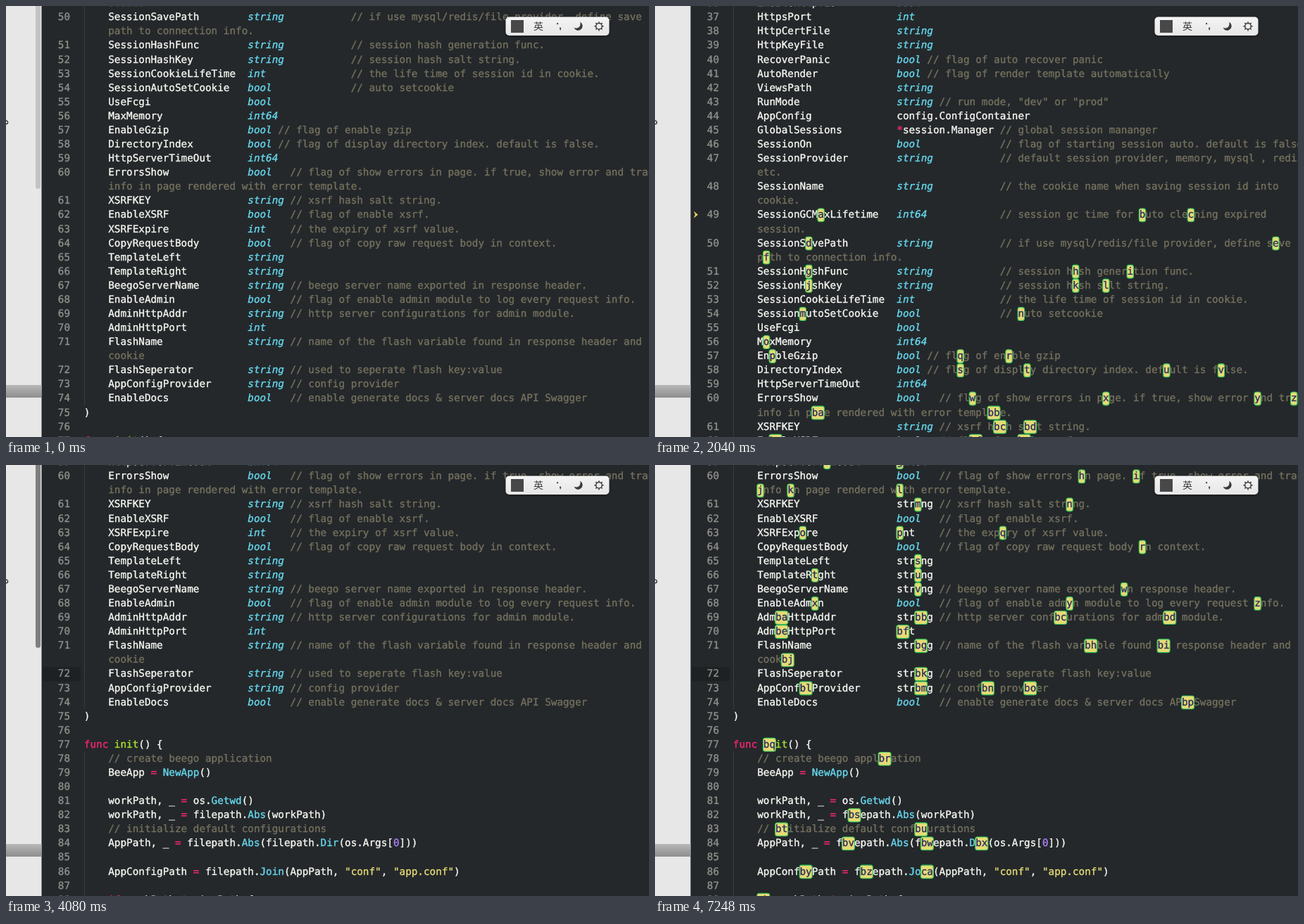
Animation of 913x613 px, one loop 8000 ms. Source, as an HTML page with a canvas:

```html
<!DOCTYPE html>
<html lang="en">
<head>
<meta charset="utf-8">
<title>Jump labels in a code editor</title>
<style>
  html, body { margin: 0; width: 100%; height: 100%; overflow: hidden; background: #24282b; }
  canvas { display: block; }
</style>
</head>
<body>
<canvas id="stage" width="913" height="613"></canvas>
<script>
const ctx = document.getElementById('stage').getContext('2d');
const W = 913, H = 613, LOOP = 8000;
const CELL = 8.61, ROW = 20.08, LEFT = 110.8, BASE = 20.3;
const MONO = '14.3px "DejaVu Sans Mono", "Noto Sans Mono", monospace';
const C = {
  bg: '#24282b', text: '#f8f8f2', type: '#66d9ef', note: '#75715e', key: '#f92672',
  func: '#a6e22e', str: '#e6db74', num: '#ae81ff', gutter: '#8f908a'
};

// name|type|comment column|comment; "~" continues a wrapped comment
const FIRST = 36;
const SOURCE = `EnableHttpTLS|bool
HttpsPort|int
HttpCertFile|string
HttpKeyFile|string
RecoverPanic|bool|32|flag of auto recover panic
AutoRender|bool|32|flag of render template automatically
ViewsPath|string
RunMode|string|34|run mode, "dev" or "prod"
AppConfig|config.ConfigContainer
GlobalSessions|*session.Manager|44|global session mananger
SessionOn|bool|44|flag of starting session auto. default is false.
SessionProvider|string|44|default session provider, memory, mysql , redis
~etc.
SessionName|string|44|the cookie name when saving session id into
~cookie.
SessionGCMaxLifetime|int64|44|session gc time for auto cleaning expired
~session.
SessionSavePath|string|44|if use mysql/redis/file provider, define save
~path to connection info.
SessionHashFunc|string|44|session hash generation func.
SessionHashKey|string|44|session hash salt string.
SessionCookieLifeTime|int|44|the life time of session id in cookie.
SessionAutoSetCookie|bool|44|auto setcookie
UseFcgi|bool
MaxMemory|int64
EnableGzip|bool|32|flag of enable gzip
DirectoryIndex|bool|32|flag of display directory index. default is false.
HttpServerTimeOut|int64
ErrorsShow|bool|34|flag of show errors in page. if true, show error and trace
~info in page rendered with error template.
XSRFKEY|string|34|xsrf hash salt string.
EnableXSRF|bool|34|flag of enable xsrf.
XSRFExpire|int|34|the expiry of xsrf value.
CopyRequestBody|bool|34|flag of copy raw request body in context.
TemplateLeft|string
TemplateRight|string
BeegoServerName|string|34|beego server name exported in response header.
EnableAdmin|bool|34|flag of enable admin module to log every request info.
AdminHttpAddr|string|34|http server configurations for admin module.
AdminHttpPort|int
FlashName|string|34|name of the flash variable found in response header and
~cookie
FlashSeperator|string|34|used to seperate flash key:value
AppConfigProvider|string|34|config provider
EnableDocs|bool|34|enable generate docs & server docs API Swagger
)

func init() {
    // create beego application
    BeeApp = NewApp()

    workPath, _ = os.Getwd()
    workPath, _ = filepath.Abs(workPath)
    // initialize default configurations
    AppPath, _ = filepath.Abs(filepath.Dir(os.Args[0]))

    AppConfigPath = filepath.Join(AppPath, "conf", "app.conf")

    if workPath != AppPath {`;

let lineNo = FIRST - 1;
const rows = SOURCE.split('\n').map(src => {
  const wrapped = src[0] === '~';
  if (!wrapped) lineNo++;
  let text = src;
  if (wrapped) text = '    ' + src.slice(1);
  else if (src.includes('|')) {
    const [name, type, col, note] = src.split('|');
    text = ('    ' + name).padEnd(27) + type;
    if (note) text = text.padEnd(+col) + '// ' + note;
  }
  return { text, wrapped, no: lineNo, guide: lineNo < 75 || lineNo > 77 };
});
const rowOf = no => rows.findIndex(r => r.no === no);

// a..z, ba..bz, ca..
function labelName(n) {
  const letter = k => String.fromCharCode(97 + k);
  return (n < 26 ? '' : letter(Math.floor(n / 26))) + letter(n % 26);
}

// Label the first hit in every word, from the given line on
function labelRows(letter, fromLine) {
  let n = 0;
  const start = rowOf(fromLine);
  return rows.map((row, i) => {
    if (i < start) return row;
    const marks = [];
    let text = row.text;
    for (const m of row.text.matchAll(/\w+/g)) {
      const at = m[0].toLowerCase().indexOf(letter);
      if (at < 0) continue;
      const col = m.index + at, name = labelName(n++);
      marks.push({ col, name });
      text = text.slice(0, col) + name + text.slice(col + name.length);
    }
    return { ...row, text, marks };
  });
}

const labelsA = labelRows('a', 49), labelsI = labelRows('i', 58);
const scenes = [
  { at: 0, top: 50, rows, thumb: [260, '#c3c3c3'] },
  { at: 1020, top: 50, rows: labelsA },
  { at: 2040, top: 37, rows: labelsA },
  { at: 3060, top: 60, rows, thumb: [294, '#7f7f7f'], caret: true },
  { at: 4080, top: 60, rows, thumb: [260, '#7f7f7f'], active: true },
  { at: 5100, top: 60, rows, active: true },
  { at: 6120, top: 60, rows: labelsI, active: true }
];

const TOKENS = [
  [/^\/\/.*/, C.note],
  [/^"[^"]*"/, C.str],
  [/^(func|if)\b/, C.key],
  [/^(string|bool|int64|int)\b/, C.type, 'italic '],
  [/^(\*|!=|=)/, C.key],
  [/^\d+/, C.num],
  [/^\w+(?=\()/, C.type],
  [/^\w+/, C.text],
  [/^./, C.text]
];

function box(x, y, w, h, r, fill) {
  ctx.beginPath();
  ctx.roundRect(x, y, w, h, r);
  ctx.fillStyle = fill;
  ctx.fill();
}

function rect(x, y, w, h, fill) {
  ctx.fillStyle = fill;
  ctx.fillRect(x, y, w, h);
}

// A thin outline gives the glyphs their slightly heavy weight
function cells(text, x, y, color, style = '') {
  ctx.font = style + MONO;
  ctx.fillStyle = ctx.strokeStyle = color;
  ctx.lineWidth = 0.35;
  [...text].forEach((ch, i) => {
    if (ch === ' ') return;
    ctx.fillText(ch, x + i * CELL, y);
    ctx.strokeText(ch, x + i * CELL, y);
  });
}

function drawCode(row, y) {
  if (row.wrapped) return cells(row.text, LEFT, y, C.note);
  const isFunc = row.text.startsWith('func ');
  let col = 0;
  while (col < row.text.length) {
    const rest = row.text.slice(col);
    const [re, color, style] = TOKENS.find(t => t[0].test(rest));
    const word = rest.match(re)[0];
    const named = isFunc && color === C.type;
    cells(word, LEFT + col * CELL, y, named ? C.func : color, style);
    col += word.length;
  }
}

function drawMark({ col, name }, y) {
  const x = LEFT + col * CELL, w = name.length * CELL;
  box(x - 0.4, y - 13.4, w + 0.8, 18.8, 3, C.str);
  ctx.strokeStyle = '#2fc65c';
  ctx.lineWidth = 1.1;
  ctx.stroke();
  cells(name, x, y, '#2a2d62');
}

function drawEditor(s) {
  rect(50, 0, W - 50, H, C.bg);
  const top = rowOf(s.top);
  for (let i = Math.max(0, top - 1); i < s.rows.length; i++) {
    const row = s.rows[i], y = BASE + (i - top) * ROW;
    if (y > H + 14) break;
    if (s.active && row.no === 72) rect(52, y - 14, 54, 20, '#1e2124');
    if (row.guide) rect(111, y - 14.5, 1, ROW, '#393d40');
    if (!row.wrapped) cells(String(row.no), 73.8, y, C.gutter);
    drawCode(row, y);
    (row.marks || []).forEach(m => drawMark(m, y));
    if (row.no === 49 && !row.wrapped) drawPointer(y - 4.6);
    if (s.caret && row.no === 72) rect(162, y - 14, 1, 20, C.text);
    if (s.caret && row.no === 75) rect(111, y + 5, 8, 1, '#c8c8c4');
  }
}

function drawPointer(y) {
  ctx.beginPath();
  ctx.moveTo(55, y - 5);
  ctx.lineTo(61, y);
  ctx.lineTo(55, y + 5);
  ctx.lineTo(57, y);
  ctx.fillStyle = '#e5d45c';
  ctx.fill();
}

function drawSidePanel(s) {
  rect(0, 0, 50.5, H, '#e7e7e7');
  if (s.thumb) box(42, -10, 7, s.thumb[0] + 10, 3.5, s.thumb[1]);
  const g = ctx.createLinearGradient(0, 539, 0, 557);
  g.addColorStop(0, '#b9b9b9');
  g.addColorStop(0.45, '#a4a4a4');
  g.addColorStop(1, '#8e8e8e');
  rect(0, 539, 50.5, 18, g);
  ctx.beginPath();
  ctx.arc(0.3, 165.5, 2.4, 0, 7);
  ctx.strokeStyle = '#222';
  ctx.lineWidth = 1.2;
  ctx.stroke();
}

function drawInputBar() {
  const ink = '#3b3b3b';
  const g = ctx.createLinearGradient(0, 15, 0, 43);
  g.addColorStop(0, '#f4f4f4');
  g.addColorStop(1, '#e6e6e6');
  ctx.save();
  ctx.shadowColor = 'rgba(0,0,0,.4)';
  ctx.shadowBlur = 4;
  ctx.shadowOffsetY = 1;
  box(709.5, 15.5, 147, 26.5, 5, g);
  ctx.restore();
  box(717, 20, 18, 18, 0, '#484848');

  ctx.fillStyle = ink;
  ctx.font = '14px "Noto Sans CJK SC", "Noto Sans CJK", sans-serif';
  ctx.fillText('英', 749, 34);
  box(782, 24, 2.2, 2.2, 1, ink);
  box(786, 30.5, 2.2, 2.2, 1, ink);
  rect(786.6, 32, 1.2, 2.4, ink);

  // crescent
  ctx.beginPath();
  ctx.arc(812.5, 28.5, 6.2, -1.05, 2.65);
  ctx.arc(809.5, 25.3, 6.2, 2.05, -0.42, true);
  ctx.fill();

  // gear
  ctx.strokeStyle = ink;
  ctx.lineWidth = 1.5;
  ctx.beginPath();
  ctx.arc(842, 28.8, 4.3, 0, 7);
  for (let k = 0; k < 8; k++) {
    const a = k * Math.PI / 4, c = Math.cos(a), n = Math.sin(a);
    ctx.moveTo(842 + 4.5 * c, 28.8 + 4.5 * n);
    ctx.lineTo(842 + 6.6 * c, 28.8 + 6.6 * n);
  }
  ctx.stroke();
}

let shown = null;
function frame(now) {
  const t = now % LOOP;
  const s = scenes.findLast(sc => sc.at <= t);
  if (s !== shown) {
    shown = s;
    ctx.textRendering = 'geometricPrecision';
    drawEditor(s);
    drawSidePanel(s);
    drawInputBar();
  }
  requestAnimationFrame(frame);
}
frame(0);
</script>
</body>
</html>
```
